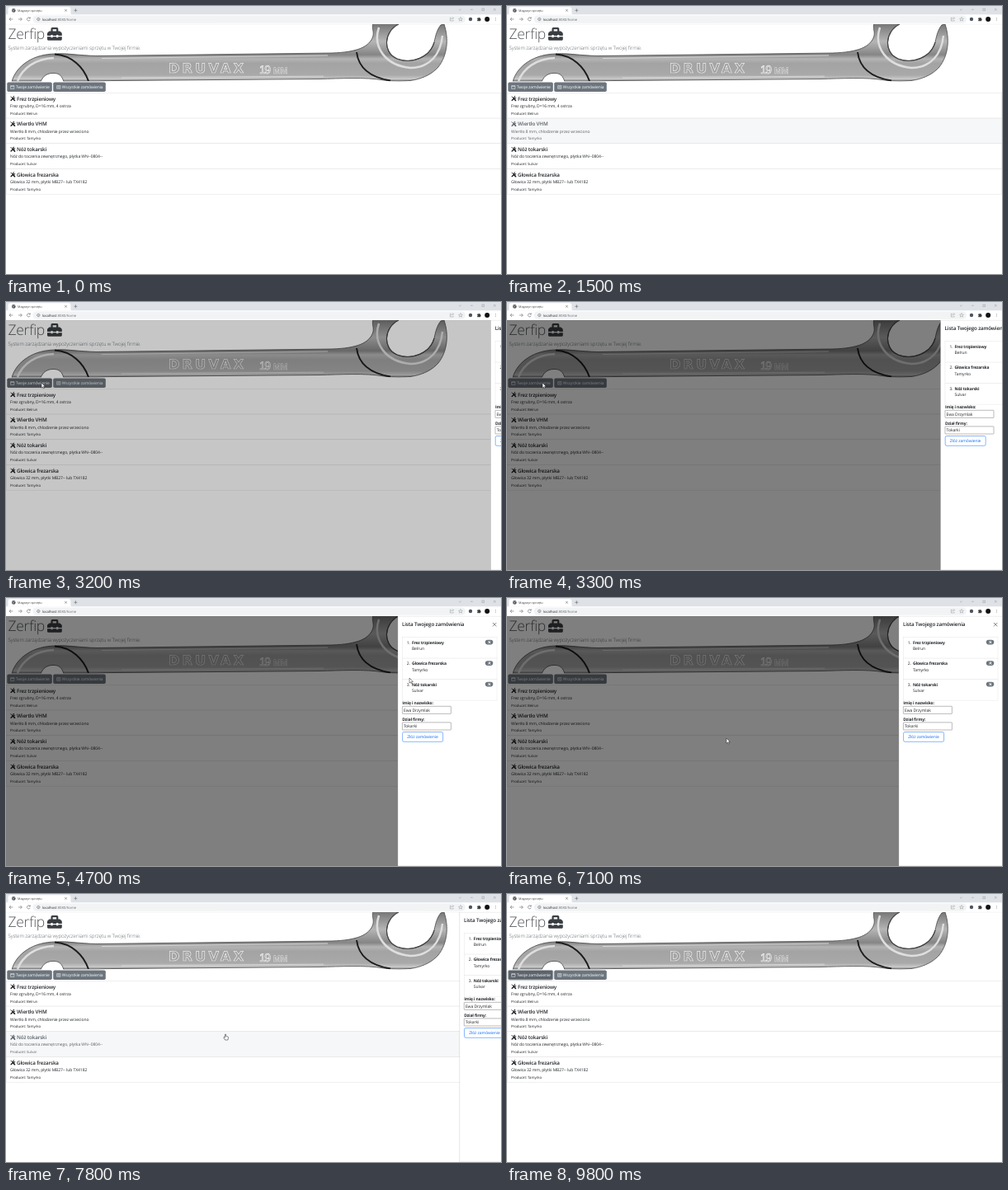
Recreate the animation shown at these times as an HTML page. Size 600 by 325 pixels, loop 9900 ms.

```html
<!DOCTYPE html>
<html lang="pl">
<head>
<meta charset="utf-8">
<title>Magazyn sprzętu</title>
<style>
  html, body { margin: 0; width: 100%; height: 100%; overflow: hidden; background: #fff; }
  svg { display: block; width: 600px; height: 325px; }
  text {
    font: 5px "Open Sans", "Noto Sans", sans-serif;
    letter-spacing: -.014em; fill: #212529;
    text-rendering: geometricPrecision; white-space: pre;
  }
  .display { font-size: 17.5px; font-weight: 300; fill: #54585c; }
  .lead { font-size: 6.25px; font-weight: 300; fill: #565e64; letter-spacing: -.022em; }
  .h5 { font-size: 6.25px; font-weight: 600; letter-spacing: -.022em; }
  .small { font-size: 4.375px; }
  .bold { font-weight: 700; letter-spacing: -.028em; }
  .tab { font-size: 3.75px; fill: #3c4043; letter-spacing: 0; }
  .url { font-size: 4.2px; fill: #202124; letter-spacing: 0; }
  .white { fill: #fff; letter-spacing: -.02em; }
  .item { color: #212529; }
  .item text { fill: currentColor; }
  .item .bg { fill: #fff; stroke: #dfdfdf; stroke-width: .5; }
  .item.hover { color: #5b6268; }
  .item.hover .bg { fill: #f6f7f8; }
  .line { fill: none; stroke: #5f6368; stroke-width: .6; }
  .line.faint { stroke: #8a8d91; stroke-width: .45; }
  .emboss { font: bold 16px "DejaVu Sans", sans-serif; fill: #a2a2a2; stroke: #ececec; stroke-width: .7; }
  .emboss.size { font-family: "Liberation Sans", sans-serif; letter-spacing: 0; }
  .submit rect { fill: #fff; stroke: #0d6efd; stroke-width: .5; }
  .submit text { fill: #0d6efd; text-anchor: middle; }
  .submit.hover rect { fill: #0d6efd; }
  .submit.hover text { fill: #fff; }
</style>
</head>
<body>
<svg id="stage" viewBox="0 0 600 325" xmlns="http://www.w3.org/2000/svg">
  <defs>
    <linearGradient id="chrome" gradientUnits="userSpaceOnUse" x1="0" y1="22" x2="0" y2="92">
      <stop offset="0" stop-color="#777"/>
      <stop offset=".3" stop-color="#b5b5b5"/>
      <stop offset=".53" stop-color="#858585"/>
      <stop offset=".6" stop-color="#b4b4b4"/>
      <stop offset=".68" stop-color="#a3a3a3"/>
      <stop offset=".88" stop-color="#a9a9a9"/>
      <stop offset=".95" stop-color="#c8c8c8"/>
      <stop offset="1" stop-color="#555"/>
    </linearGradient>
    <clipPath id="banner"><path d="M0 22H600V91.3H0Z"/></clipPath>
    <clipPath id="content"><path d="M0 22H600V325H0Z"/></clipPath>
    <symbol id="tools" viewBox="0 0 16 16">
      <g fill="none" stroke="currentColor">
        <path d="M1.5 1.5 9 9" stroke-width="2.4"/>
        <path d="M9.5 9.5 14 14" stroke-width="4" stroke-linecap="round"/>
        <path d="M10 6 2.6 13.4" stroke-width="3.4" stroke-linecap="round"/>
        <path d="M12.6 1.5A3.2 3.2 0 1 0 14.6 4.4" stroke-width="2.4"/>
      </g>
    </symbol>
  </defs>
  <rect width="600" height="325" fill="#fff"/>
  <g id="window"></g>
  <g id="page"></g>
  <g clip-path="url(#content)">
    <rect id="backdrop" y="22" width="600" height="303"/>
    <g id="panel"></g>
  </g>
  <g id="cursor">
    <path id="arrow" d="M0 0V6.2L1.5 4.9 2.5 7 3.4 6.6 2.5 4.5H4.4Z" fill="#fff" stroke="#111" stroke-width=".45"/>
    <path id="hand" d="M-.6 .3Q0-.5 .6 .3V2.5L3 3.1Q3.7 3.4 3.5 4.4L2.9 7H-.4L-2.2 4.2Q-2.2 3.2-1.3 3.6L-.6 4.2Z" fill="#fff" stroke="#111" stroke-width=".5"/>
  </g>
</svg>
<script>
const $ = id => document.getElementById(id);
const text = (x, y, str, cls = '') => `<text x="${x}" y="${y}" class="${cls}">${str}</text>`;
const line = (d, cls = '') => `<path class="line ${cls}" d="${d}"/>`;
const box = (x, y, w, h, attrs) => `<rect x="${x}" y="${y}" width="${w}" height="${h}" ${attrs}/>`;
const tools = (x, y, s) => `<use href="#tools" x="${x}" y="${y}" width="${s}" height="${s}"/>`;

$('window').innerHTML =
  box(0, 0, 600, 10.3, 'fill="#dee1e6"') +
  '<path d="M1 10.4Q2.6 10.4 2.6 8.5V3.5Q2.6 1.2 5 1.2H76Q78.4 1.2 78.4 3.5V8.5Q78.4 10.4 80 10.4Z" fill="#fff"/>' +
  '<circle cx="9.3" cy="5.4" r="2.3" fill="#4d5156"/>' +
  '<path d="M7.8 4.6 9.2 5.3 8.8 6.6M9.8 3.6 10.8 4.8" stroke="#fff" stroke-width=".6" fill="none"/>' +
  text(14, 6.8, 'Magazyn sprzętu', 'tab') +
  line('M71.2 4 73.8 6.6M73.8 4 71.2 6.6M82.4 5.3H86.4M84.4 3.3V7.3') +
  line('M549 3.8 550.3 5 551.6 3.8M563 4.3H565.8M576.9 3H579.5V5.6H576.9ZM591 3 593.6 5.6M593.6 3 591 5.6', 'faint') +
  box(32.5, 11.5, 524.5, 9.2, 'rx="4.6" fill="#f1f3f4"') +
  line('M8.4 16H4.2M6 14 4 16 6 18') +
  line('M15 16H19.2M17.4 14 19.4 16 17.4 18') +
  line('M29 14.7A2 2 0 1 0 29.3 16.7M29.3 13.4V15H27.6') +
  line('M41 16.1A1.7 1.7 0 1 1 41 16M39.3 15.8V17.1M39.3 14.9V15.3') +
  text(44, 17.6, 'localhost<tspan fill="#6b7075">:8080/home</tspan>', 'url') +
  line('M540 14.3H538.4V18H542.2V16.8M539.6 16.5Q540 14.6 542.4 14.6M541.4 13.5 542.6 14.6 541.4 15.7', 'faint') +
  line('M551 13.6 551.7 15.3 553.4 15.4 552.1 16.5 552.5 18.2 551 17.2 549.5 18.2 549.9 16.5 548.6 15.4 550.3 15.3Z', 'faint') +
  '<circle cx="563" cy="16" r="2.2" fill="#4b5563"/>' +
  '<path d="M571.2 14.6H572.5A.9.9 0 0 1 574.2 14.6H575.2V15.7A.9.9 0 0 1 575.2 17.3V18.3H571.2V17.2A.8.8 0 0 0 571.2 15.7Z" fill="#3c4043"/>' +
  '<circle cx="583.2" cy="16" r="3" fill="#111"/>' +
  [14.4, 16, 17.6].map(y => `<circle cx="593.3" cy="${y}" r=".45" fill="#5f6368"/>`).join('') +
  box(0, 21.9, 600, .3, 'fill="#dadce0"');

const wrench = `<g clip-path="url(#banner)">
  <path d="M7 92C12 72 34 58 60 58C74 57 88 60 110 60.5L395 57C425 56 441 50 445 36
    C446 30 443 26 445 21H476C458 31 456 56 474 64C492 71 514 62 519 44C521 34 523 28 527 23
    L531 22C537 40 535 60 524 74C510 90 484 94 458 90C435 86 405 88 380 88.5L130 90.5L100 92H70
    C68 85 65 82 59 81.5C51 81 45 84 42 92Z" fill="url(#chrome)" stroke="#444" stroke-width=".8"/>
  <path d="M59 58.5C80 60 94 74 100 91M425 56C427 72 438 86 466 90.5"
    fill="none" stroke="#1c1c1c" stroke-width="2"/>
  <path d="M476 22C458 31 456 56 474 64C492 71 514 62 519 44" fill="none" stroke="#444" stroke-width="1.2"/>
  <path d="M116 63.5L390 60M140 87L385 85.2" fill="none" stroke="#d8d8d8" stroke-width="1"/>
  <path d="M14 91C20 75 36 64 58 63M452 26C444 50 460 72 490 75C514 75 527 58 529 36"
    fill="none" stroke="#dedede" stroke-width="2.5"/>
  <text x="197" y="81" class="emboss" style="letter-spacing:3.3px">DRUVAX</text>
  <text x="307" y="81.5" class="emboss size" style="font-weight:400;font-size:14px;letter-spacing:-1.5px">19</text>
  <text x="324" y="81.5" class="emboss size" style="font-size:10.5px;stroke-width:.4">MM</text>
</g>`;

const toolbox = `<path transform="translate(50 25)scale(.0347)" fill="#3a3e42" fill-rule="evenodd"
  d="M0 237a32 32 0 0 1 9-22l45-45a32 32 0 0 1 23-10h51V80a48 48 0 0 1 48-48h160a48 48 0 0 1 48 48v80h51a32 32 0 0 1 23 10l45 45a32 32 0 0 1 9 22v83H384v-32h-64v32H192v-32h-64v32H0zM192 96v64h128V96z
  M0 352h128v32h64v-32h128v32h64v-32h128v96a32 32 0 0 1-32 32H32a32 32 0 0 1-32-32z"/>`;

const stock = [
  ['Frez trzpieniowy', 'Frez zgrubny, D=16 mm, 4 ostrza', 'Belrun'],
  ['Wiertło VHM', 'Wiertło 8 mm, chłodzenie przez wrzeciono', 'Tamyrko'],
  ['Nóż tokarski', 'Nóż do toczenia zewnętrznego, płytka WN--0804--', 'Sulvar'],
  ['Głowica frezarska', 'Głowica 32 mm, płytki MB27-- lub TX4182', 'Tamyrko'],
];
const stockRow = ([name, info, maker], i) => `<g class="item" transform="translate(0 ${105.4 + i * 30.7})">` +
  box(.2, 0, 599.6, 30.7, 'class="bg"') + tools(5, 3.7, 6.5) +
  text(13, 9.2, name, 'h5') + text(5, 17.5, info) + text(5, 26.2, 'Producet: ' + maker, 'small') + '</g>';

$('page').innerHTML = wrench +
  text(2.4, 40, 'Zerfip', 'display') + toolbox +
  text(2.4, 53.1, 'System zarządzania wypożyczeniami sprzętu w Twojej firmie.', 'lead') +
  box(1.3, 92.5, 54.5, 11.6, 'rx="1.8" id="mine"') +
  box(57.2, 92.5, 63.6, 11.6, 'rx="1.8" fill="#6c757d"') +
  '<path d="M5.6 96.6H9.9V100.4H5.6ZM5.6 97.6H9.9M61.6 96.6H66V100.2H61.6ZM62.4 97.8H65.2M62.4 99H65.2" fill="none" stroke="#fff" stroke-width=".5"/>' +
  text(11.7, 100, 'Twoje zamówienie', 'white') +
  text(67.8, 100, 'Wszystkie zamówienia', 'white') +
  stock.map(stockRow).join('');

const orderRow = ([name, , maker], i) => `<g transform="translate(480.4 ${47.6 + i * 25.5})">` +
  box(0, 0, 114.6, 25.5, 'fill="#fff" stroke="#dfdfdf" stroke-width=".4"') +
  text(5.4, 8.1, i + 1 + '.') + text(11.5, 8.1, name, 'bold') + text(11.5, 15.6, maker) +
  box(100.5, 3.2, 9.4, 5.6, 'rx="2.8" fill="#6c757d"') + `<g color="#fff">${tools(103.3, 4, 4)}</g></g>`;
const field = (y, label, value) => text(480.3, y, label, 'bold') +
  box(480.4, y + 2, 59, 9.1, 'rx=".5" fill="#fff" stroke="#767676" stroke-width=".5"') +
  text(482, y + 8.4, value);

$('panel').innerHTML =
  box(475, 22, 126, 303, 'fill="#fff" stroke="#aaa" stroke-width=".3"') +
  text(480, 33.6, 'Lista Twojego zamówienia', 'h5') +
  '<path d="M590 30 594.4 34.4M594.4 30 590 34.4" stroke="#555" stroke-width=".7"/>' +
  [stock[0], stock[3], stock[2]].map(orderRow).join('') +
  field(129.3, 'Imię i nazwisko:', 'Ewa Drzymlak') + field(148.9, 'Dział firmy:', 'Tokarki') +
  '<g class="submit">' + box(480.6, 162.5, 49, 11.8, 'rx="1.8"') + text(505, 170.2, 'Złóż zamówienie') + '</g>';

const items = [...document.querySelectorAll('.item')];
const submit = document.querySelector('.submit');

// [time, x, y] of the pointer tip
const route = [
  [3200, 43, 98], [3400, 43, 98], [3700, 190, 128], [4000, 371, 153], [4300, 430, 135],
  [4700, 489, 97], [4800, 503, 87], [5000, 500, 89], [5300, 490, 112], [5600, 503, 165],
  [6000, 508, 167], [6300, 496, 177], [6600, 410, 180], [7000, 280, 171], [7100, 266, 170],
  [7700, 266, 170], [8500, 266, 170],
];
// [time, hovered stock row], -1 for none
const hovers = [[0, -1], [1300, 3], [1400, 2], [1500, 1], [2400, 0], [2600, -1], [7700, 2], [8500, -1]];

const LOOP = 9900, STEP = 100, OPEN = 3133, CLOSE = 7633;
const clamp = v => Math.min(1, Math.max(0, v));

// cubic-bezier(.42, 0, .58, 1)
function easeInOut(x) {
  if (x <= 0 || x >= 1) return clamp(x);
  let lo = 0, hi = 1;
  for (let i = 0; i < 20; i++) {
    const s = (lo + hi) / 2;
    const bx = 3 * s * (1 - s) * (.42 * (1 - s) + .58 * s) + s ** 3;
    if (bx < x) lo = s; else hi = s;
  }
  return lo * lo * (3 - 2 * lo);
}

function pointerAt(t) {
  const n = route.findIndex(p => p[0] > t);
  if (n < 1) return null;
  const [a, b] = [route[n - 1], route[n]], k = (t - a[0]) / (b[0] - a[0]);
  return [a[1] + (b[1] - a[1]) * k, a[2] + (b[2] - a[2]) * k];
}

function draw(time) {
  const t = Math.floor(time % LOOP / STEP) * STEP;
  const shown = easeInOut((t - OPEN) / 300) - easeInOut((t - CLOSE) / 300);
  $('panel').setAttribute('transform', `translate(${125.5 * (1 - shown)} 0)`);
  $('backdrop').setAttribute('opacity', .5 * (clamp((t - OPEN) / 150) - clamp((t - CLOSE) / 150)));

  const row = hovers.filter(h => h[0] <= t).pop()[1];
  items.forEach((el, i) => el.classList.toggle('hover', i === row));
  const overSubmit = t >= 5600 && t < 6300;
  submit.classList.toggle('hover', overSubmit);

  const focused = t >= 8000;
  const dark = focused || t >= 2700 && t < 3300;
  $('mine').setAttribute('fill', dark ? '#5c636a' : '#6c757d');
  $('mine').setAttribute('stroke', focused ? '#a9afb5' : 'none');

  const p = pointerAt(t), hand = t >= 7700 || overSubmit;
  $('cursor').style.display = p ? '' : 'none';
  if (p) $('cursor').setAttribute('transform', `translate(${p})`);
  $('hand').style.display = hand ? '' : 'none';
  $('arrow').style.display = hand ? 'none' : '';
}

const start = performance.now();
(function tick() {
  draw(performance.now() - start);
  requestAnimationFrame(tick);
})();
</script>
</body>
</html>
```
